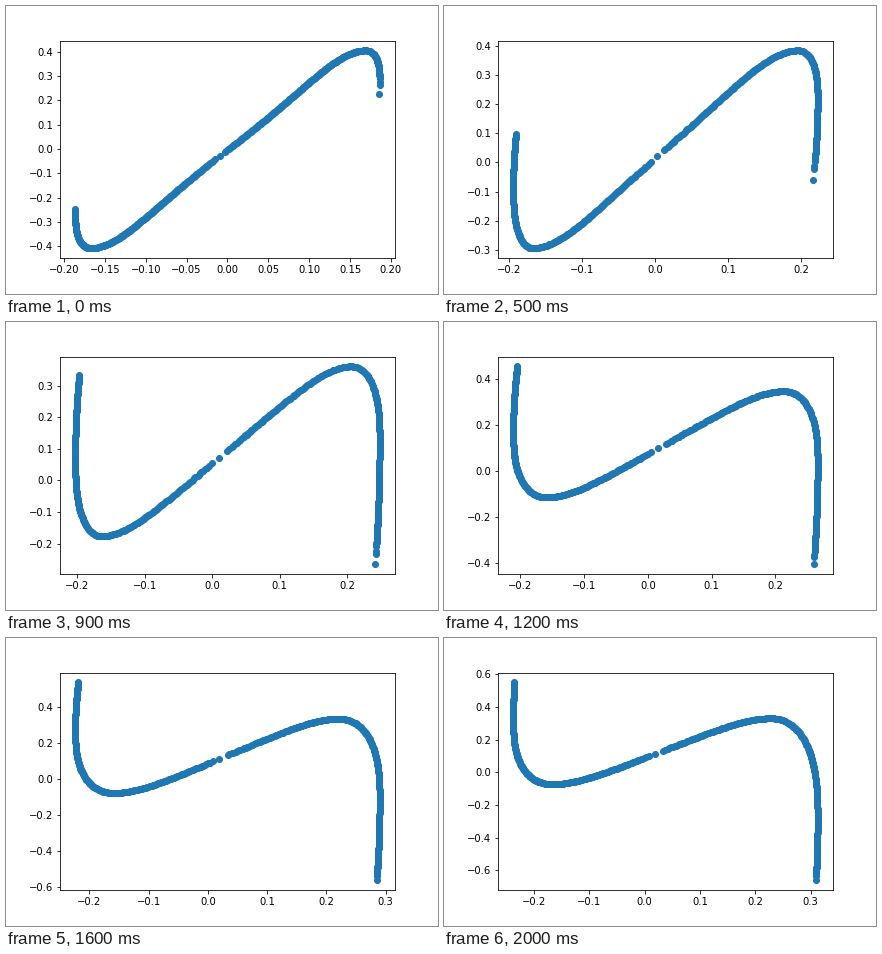
A matplotlib script that plays this animation: 432 by 288 pixels, repeating every 2100 ms.

```python
import numpy as np
import matplotlib.pyplot as plt
from matplotlib.animation import FuncAnimation

FRAMES, INTERVAL = 21, 100
MID = -.06   # place of the lone middle dot between valley (-1) and peak (1)

rng = np.random.default_rng(4)


def dots(start, stop, n=260):
    """Arc fractions from the middle (0) to a tip (1), sparse near the middle."""
    t = (np.arange(n) + .6 * rng.random(n)) / n
    return start + (stop - start) * t ** .8


U = np.concatenate([[0], dots(.022, .935), [.95, .96, 1], -dots(.028, 1)])


def move(t, start, end, rise=1, settle=1):
    """Ease from start to end: slow start for rise > 1, slow stop for settle > 1."""
    return start + (end - start) * (1 - (1 - t ** rise) ** settle)


def side(turn, edge, tip):
    """Rounded corner from a turning point to the edge, then the tail to the tip."""
    a = np.linspace(0, np.pi / 2, 80)
    corner = np.column_stack([turn[0] + (edge[0] - turn[0]) * np.sin(a) ** .92,
                              edge[1] + (turn[1] - edge[1]) * np.abs(np.cos(a)) ** .74])
    s = np.linspace(0, 1, 60)
    tail = edge + (tip - edge) * np.column_stack([s ** 2, s])
    return np.vstack([corner, tail])


def points(k):
    t = k / (FRAMES - 1)
    tip_l = np.array([move(t, -.1862, -.2358, 1.9), move(t, -.247, .552, 1.2, 2.7)])
    edge_l = np.array([move(t, -.1863, -.2376, 1.4), move(t, -.268, .321, 1.2, 1.8)])
    valley = np.array([-.167 + .01 * np.sin(np.pi * t * t) ** 2,
                       move(t, -.4087, -.073, 1.6, 3.6)])
    peak = np.array([move(t, .169, .228, .6), move(t, .4064, .3313, 1.6, 2.8)])
    edge_r = np.array([move(t, .1862, .3128, .9), move(t, .28, -.2926, 1.6)])
    tip_r = np.array([move(t, .1853, .3096), move(t, .227, -.6613, 1, 1.35)])
    spread = move(t, 1, .2, 1.6, 2)

    # Odd polynomial, flat at both ends, with the given slope in the middle.
    w = np.linspace(-1, 1, 161)
    slope = move(t, 1.08, 1.3, .5)
    f = slope * w + (2.5 - 2 * slope) * w ** 3 + (slope - 1.5) * w ** 5
    middle = (valley + peak) / 2 + (peak - valley) / 2 * np.column_stack([w, f])
    left = side(valley, edge_l, tip_l)[::-1]
    curve = np.vstack([left, middle, side(peak, edge_r, tip_r)])

    # Spread the dots by arc length as seen on screen.
    step = np.diff(curve, axis=0) / np.ptp(curve, axis=0) * (304, 198)
    arc = np.concatenate([[0], np.cumsum(np.hypot(*step.T))])
    zero = np.interp(MID, w, arc[len(left):len(left) + len(w)])
    d = 1 - np.abs(U)
    d = d * (spread + (1 - spread) * np.minimum(d / .3, 1))
    s = np.where(U < 0, zero * d, arc[-1] - (arc[-1] - zero) * d)
    return np.column_stack([np.interp(s, arc, c) for c in curve.T])


fig, ax = plt.subplots(figsize=(6, 4), dpi=72)
fig.subplots_adjust(left=.125, right=.9, bottom=.125, top=.88)
cloud = ax.scatter(*points(0).T)


def draw(k):
    xy = points(k)
    cloud.set_offsets(xy)
    lo, hi = xy.min(axis=0), xy.max(axis=0)
    pad = .05 * (hi - lo)
    ax.set_xlim(lo[0] - pad[0], hi[0] + pad[0])
    ax.set_ylim(lo[1] - pad[1], hi[1] + pad[1])
    return cloud,


anim = FuncAnimation(fig, draw, frames=FRAMES, interval=INTERVAL, repeat=True, repeat_delay=0)
plt.show()
```
